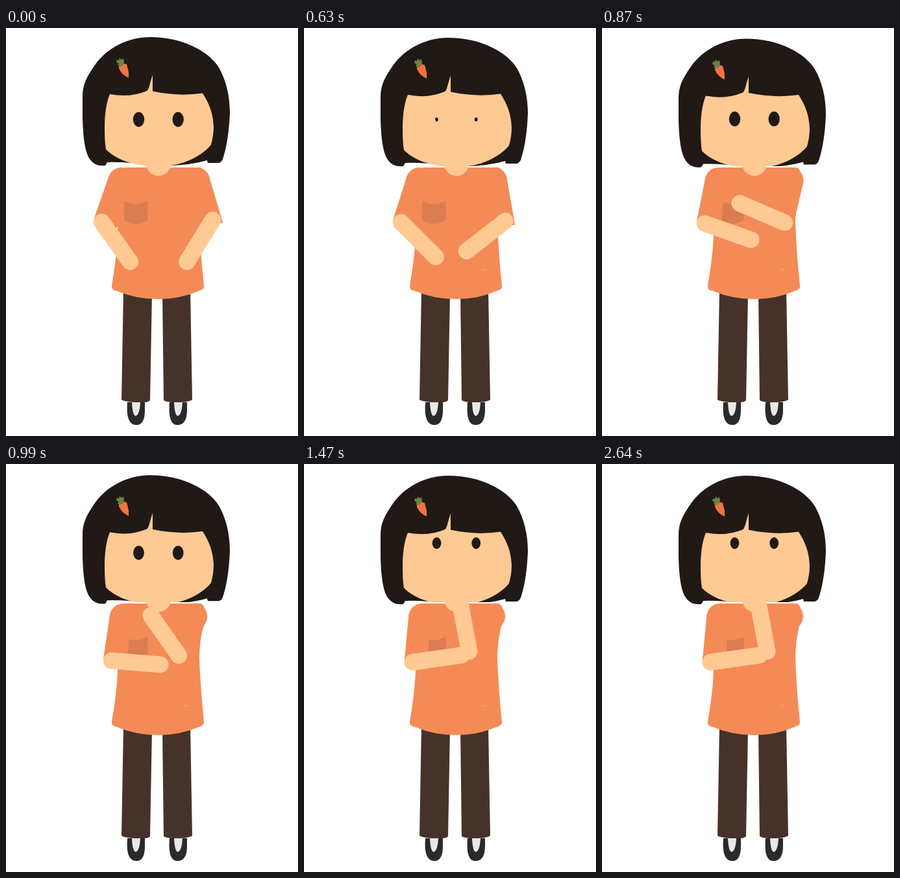
An HTML page with a canvas that plays this animation: 450 by 629 pixels, repeating every 3300 ms.

```html
<!DOCTYPE html>
<html lang="en">
<head>
<meta charset="utf-8">
<title>Thinking girl</title>
<style>
html, body { margin: 0; width: 100%; height: 100%; overflow: hidden; background: #fff; }
canvas { display: block; width: 450px; height: 629px; }
</style>
</head>
<body>
<canvas id="stage" width="450" height="629"></canvas>
<script>
const ctx = document.getElementById('stage').getContext('2d');
const LOOP = 3300, STEP = 30;
const HAIR = '#211915', SKIN = '#ffc994', SHIRT = '#f48b57', POCKET = '#da7d51',
      PANTS = '#45332b', SHOE = '#2a2a2b', TONGUE = '#e8e8e8';
const TIMES = [300, 630, 870, 1110, 1380];

// Monotone cubic curve through the five key poses, flat at both ends.
function pose(keys, t) {
  const n = TIMES.length - 1;
  if (t <= TIMES[0]) return keys[0];
  if (t >= TIMES[n]) return keys[n];
  const slope = i => (keys[i + 1] - keys[i]) / (TIMES[i + 1] - TIMES[i]);
  const tangent = i => {
    if (i === 0 || i === n) return 0;
    const a = slope(i - 1), b = slope(i);
    return a * b <= 0 ? 0 : 2 * a * b / (a + b);
  };
  let i = 0;
  while (t >= TIMES[i + 1]) i++;
  const h = TIMES[i + 1] - TIMES[i], s = (t - TIMES[i]) / h;
  const s2 = s * s, s3 = s2 * s;
  return keys[i] * (2 * s3 - 3 * s2 + 1) + keys[i + 1] * (3 * s2 - 2 * s3) +
    h * (tangent(i) * (s3 - 2 * s2 + s) + tangent(i + 1) * (s3 - s2));
}

const clamp = v => Math.max(0, Math.min(1, v));
const sine = (t, a, b) => (1 - Math.cos(Math.PI * clamp((t - a) / (b - a)))) / 2;

function shape(d, color) {
  ctx.fillStyle = color;
  ctx.fill(new Path2D(d));
}

function oval(x, y, rx, ry, color) {
  ctx.fillStyle = color;
  ctx.beginPath();
  ctx.ellipse(x, y, rx, ry, 0, 0, 7);
  ctx.fill();
}

function poly(points, color) {
  ctx.fillStyle = color;
  ctx.beginPath();
  points.forEach(p => ctx.lineTo(p[0], p[1]));
  ctx.fill();
}

// Eye scale during a blink: quick close, short hold, reopen.
function blink(t, start) {
  const low = 0.27, u = t - start;
  if (u <= 0 || u >= 450) return 1;
  if (u < 180) return low + (1 - low) * (1 - u / 180) ** 2;
  if (u < 270) return low;
  return low + (1 - low) * sine(u, 270, 450);
}

function drawLegs() {
  shape('M181 404L225 410L222 574Q219 577 214 577L198 577Q182 576 178 573Z', PANTS);
  shape('M241 410L284 404L287 573Q283 576 270 577Q250 578 243 574Z', PANTS);
  for (const x of [200, 265]) {
    const d = x < 230 ? -1 : 1;
    shape(`M${x - 13} 577Q${x - 16} 612 ${x - d} 612Q${x + 14} 612 ${x + 14} 589L${x + 14} 577Z`, SHOE);
    shape(`M${x - 6} 577Q${x - 5} 598 ${x} 598Q${x + 6} 596 ${x + 7} 577Z`, TONGUE);
  }
}

function drawHead(t) {
  const drop = 4 * sine(t, 310, 1250);
  ctx.save();
  ctx.translate(0, drop);
  shape('M222 14C188 14 155 31 137 57C124 76 118 87 118 106L118 140C119 172 122 191 129 202' +
    'Q137 214 153 212L156 207Q182 206 218 211L253 212Q286 211 310 204L311 208L328 208' +
    'Q333 207 335 199C341 180 344 156 345 131C345 104 339 80 328 61C313 36 272 14 222 14Z', HAIR);
  shape('M160 102C154 116 152 135 152 155Q152 176 154 187C168 202 194 211 222 213L252 212' +
    'C278 209 302 197 316 180Q320 166 320 152C319 132 314 118 303 100.5Q266 106 226 97.5L226 72' +
    'Q223 81 221 89Q219 96 217 97Q191 108 160 102Z', SKIN);
  shape('M174 58Q180 53 186 56L189 68L189 77Q178 72 174 62Z', '#f07340');
  shape('M175 60L172 57L174 55L170 53L171 49L174 50L175 46L178 49L181 47L182 53L180 58Z', '#6d8244');
  ctx.restore();
  ctx.fillStyle = '#fff';
  ctx.fillRect(156, 213, 154, 3);

  const size = (1 - 0.21 * sine(t, 840, 1380)) * blink(t, 390) * blink(t, 2190);
  const y = 141 - 19 * sine(t, 780, 1475);
  oval(204.5, y, 8.7 * size, 11.4 * size, HAIR);
  oval(265.2, y, 8.7 * size, 11.4 * size, HAIR);
}

function drawTorso() {
  shape('M183 215L300 215Q310 220 306 242Q298 270 298 300Q300 350 305 397Q306 403 298 405' +
    'Q268 418 235 418Q200 418 170 405Q162 404 163 397Q171 350 172 318L171 245Q171 222 183 215Z', SHIRT);
  ctx.fillStyle = '#f9a678';
  ctx.fillRect(275, 372, 7, 1);
}

// side: -1 for the arm on the left, 1 for the arm on the right
function drawSleeve(shoulder, elbow, r, side, extra) {
  const [sx, sy] = shoulder, [ex, ey] = elbow;
  const len = Math.hypot(ex - sx, ey - sy);
  const ux = (ex - sx) / len, uy = (ey - sy) / len;
  const nx = side * uy, ny = -side * ux;
  oval(sx, sy, r, r, SHIRT);
  poly([
    [sx + nx * r, sy + ny * r],
    [ex + nx * 13 + ux * extra, ey + ny * 13 + uy * extra],
    [ex - nx * 25, ey - ny * 25],
    [sx - nx * r, sy - ny * r]
  ], SHIRT);
}

function drawPocket(t) {
  const top = pose([182, 182, 188, 191, 192], t);
  const low = pose([182, 182, 183, 191, 192], t);
  ctx.save();
  ctx.beginPath();
  ctx.moveTo(top, 262);
  ctx.lineTo(220, 262);
  ctx.lineTo(220, 305);
  ctx.lineTo(low, 305);
  ctx.clip();
  shape('M182 266Q200 277 218.5 266L218.5 296Q200 308 182 296Z', POCKET);
  ctx.restore();
}

function drawForearm(elbow, degrees) {
  const a = degrees * Math.PI / 180;
  ctx.strokeStyle = SKIN;
  ctx.lineWidth = 25.5;
  ctx.lineCap = 'round';
  ctx.beginPath();
  ctx.moveTo(elbow[0], elbow[1]);
  ctx.lineTo(elbow[0] + 75.5 * Math.cos(a), elbow[1] + 75.5 * Math.sin(a));
  ctx.stroke();
}

function draw(t) {
  ctx.fillStyle = '#fff';
  ctx.fillRect(0, 0, 450, 629);
  const left = [pose([147.5, 149.5, 158.5, 165.5, 167.5], t), pose([299, 299.5, 301.5, 304.5, 305.5], t)];
  const right = [pose([318.5, 310, 281.5, 257, 254.7], t), pose([296, 297.5, 300, 290, 289], t)];
  const leftShoulder = pose([178, 178, 179.5, 181.5, 182], t);
  const rightShoulder = pose([294, 293, 290.5, 290, 290], t);
  drawLegs();
  drawHead(t);
  drawTorso();
  drawSleeve([leftShoulder, 236], left, 21, -1, 0);
  drawSleeve([rightShoulder, 235], right, 20, 1, 10);
  drawPocket(t);
  oval(235, 209, 19, 19, SKIN);
  drawForearm(right, pose([121.6, 142, 203.2, 254.7, 259.4], t));
  drawForearm(left, pose([54.5, 45, 19.4, -5, -8], t));
}

const begin = performance.now();
function tick() {
  const t = (performance.now() - begin) % LOOP;
  draw(Math.floor(t / STEP) * STEP);
  requestAnimationFrame(tick);
}
tick();
</script>
</body>
</html>
```
